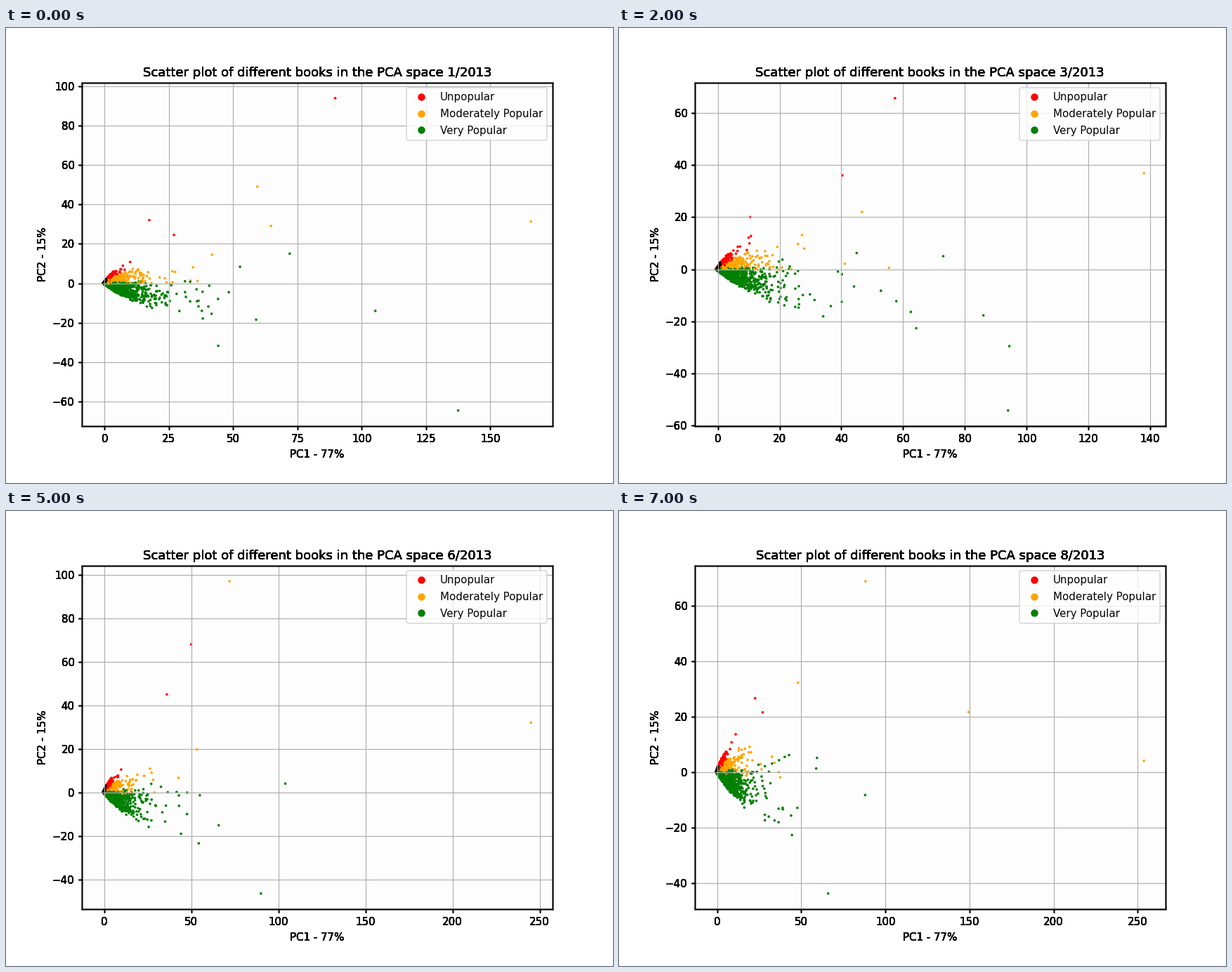
Recreate the animation shown at these times as a matplotlib script. Size 864 px wide and 648 px high, loop 8000 ms.

```python
import numpy as np
import matplotlib.pyplot as plt
from matplotlib.animation import FuncAnimation
from matplotlib.lines import Line2D

W, H, DPI = 864, 648, 108
COLORS = {"r": "red", "o": "orange", "g": "green", "k": "black"}
NAMES = ["Unpopular", "Moderately Popular", "Very Popular"]
COPIES = 7  # overlaid axes that give the heavy labels and frame
MARGIN = .05
X_MIN = -.5

# The few books that set each month's view: colour, PC1, PC2.
MONTHS = [
    [("r", 89.7, 93.8), ("r", 17.4, 32), ("r", 27, 24.5), ("o", 165.8, 31.3),
     ("o", 59.4, 49), ("o", 64.7, 29), ("g", 137.5, -64.5), ("g", 105.3, -14),
     ("g", 44.2, -31.7), ("g", 72, 15)],
    [("r", 70, 78), ("r", 30, 34), ("o", 150, 34), ("o", 52, 33),
     ("g", 110, -60), ("g", 82, -22)],
    [("r", 57.4, 65.6), ("r", 40.3, 36), ("r", 10.5, 20), ("o", 138, 36.8),
     ("o", 46.7, 22), ("g", 94, -54.2), ("g", 94.4, -29.5), ("g", 86, -17.7),
     ("g", 73, 5)],
    [("r", 68.8, 124.1), ("r", 31.4, 38.6), ("o", 77.3, 54.8), ("o", 98.2, 25.1),
     ("g", 205, -1.5), ("g", 104, -53.1), ("g", 60, -46.5), ("g", 93.4, -.3)],
    [("r", 272.5, 188.8), ("r", 11.8, 22.5), ("r", 21.6, 18), ("o", 79.4, 28.7),
     ("o", 73.1, 1.2), ("g", 91, -43.5), ("g", 63, -29.5)],
    [("r", 50, 68), ("r", 36, 45), ("o", 245, 32), ("o", 72, 97),
     ("g", 90, -46.5), ("g", 104, 4)],
    [("r", 34.3, 45.3), ("r", 32, 36.7), ("r", 46.3, 35.5), ("o", 221.5, 24.6),
     ("o", 58.3, 63.8), ("o", 84.6, 15.2), ("g", 96.7, 9.3), ("g", 87.5, -33.5),
     ("g", 56.5, -43.9), ("g", 75, -28.6)],
    [("r", 22.6, 26.6), ("r", 27.1, 21.5), ("o", 253.7, 4), ("o", 88.2, 68.8),
     ("o", 149.5, 21.6), ("o", 48.1, 32.2), ("g", 88, -8.3), ("g", 66, -43.8)],
]


def fan(rng, n, scale, low, high, start=0, reach=30, bend=40):
    """Points thinning out from the origin between two slopes."""
    x = start + rng.exponential(scale, n)
    x = x[x < reach]
    y = x * rng.uniform(low, high, x.size) / (1 + x / bend)
    y += rng.normal(0, .04, x.size) * (2 + x)
    return np.column_stack([x + X_MIN, y])


def cloud(index, books):
    rng = np.random.default_rng(40 + index)
    groups = {
        "r": [fan(rng, 380, 1.6, .7, 2, reach=7, bend=12),
              fan(rng, 5, 4, .9, 1.5, 6, 20)],
        "o": [fan(rng, 400, 4, -.08, .85, reach=20, bend=25),
              fan(rng, 14, 12, 0, .6, 15, 60, 80)],
        "g": [fan(rng, 1300, 4.8, -1, .04),
              fan(rng, 30, 14, -.75, .2, 20, 70, 120)],
    }
    for key, x, y in books:
        groups[key].append(np.array([[x, y]]))
    groups = {key: np.vstack(parts) for key, parts in groups.items()}
    points = np.vstack(list(groups.values()))
    colors = np.concatenate([[COLORS[k]] * len(g) for k, g in groups.items()])
    order = rng.permutation(len(points))
    core = fan(rng, 45, .4, .6, 2.2, reach=1.6)
    return (np.vstack([points[order], core]),
            list(colors[order]) + [COLORS["k"]] * len(core))


def padded(low, high):
    pad = MARGIN * (high - low)
    return low - pad, high + pad


def legend_corner(x, y):
    crowded = (x > .7 * x.max()) & (y > .8 * y.max())
    return "upper left" if crowded.any() else "upper right"


plt.rcParams.update({"font.family": "DejaVu Sans", "font.size": 10})
fig = plt.figure(figsize=(W / DPI, H / DPI), dpi=DPI, facecolor="white")
rect = [.125, .125, .775, .755]
ax = fig.add_axes(rect, facecolor="#fdfdfd")
layers = [ax] + [fig.add_axes(rect, sharex=ax, sharey=ax, facecolor="none")
                 for _ in range(COPIES)]
for layer in layers:
    layer.set_xlabel("PC1 - 77%", labelpad=5)
    layer.set_ylabel("PC2 - 15%")
ax.grid(True)
dots = ax.scatter([], [], s=2)
keys = [Line2D([], [], ls="", marker="o", ms=30 ** .5, mew=1.5, color=COLORS[k])
        for k in "rog"]
legend = ax.legend(keys, NAMES, loc="upper right", numpoints=1, labelspacing=.58)
clouds = [cloud(i, books) for i, books in enumerate(MONTHS)]


def update(i):
    points, colors = clouds[i]
    dots.set_offsets(points)
    dots.set_color(colors)
    x, y = np.array([book[1:] for book in MONTHS[i]]).T
    ax.set_xlim(*padded(X_MIN, x.max()))
    ax.set_ylim(*padded(y.min(), y.max()))
    legend.set_loc(legend_corner(x, y))
    for layer in layers:
        layer.set_title(f"Scatter plot of different books in the PCA space {i + 1}/2013")
    return []


anim = FuncAnimation(fig, update, frames=len(MONTHS), interval=1000,
                     init_func=lambda: [], repeat=True, repeat_delay=0)
plt.show()
```
